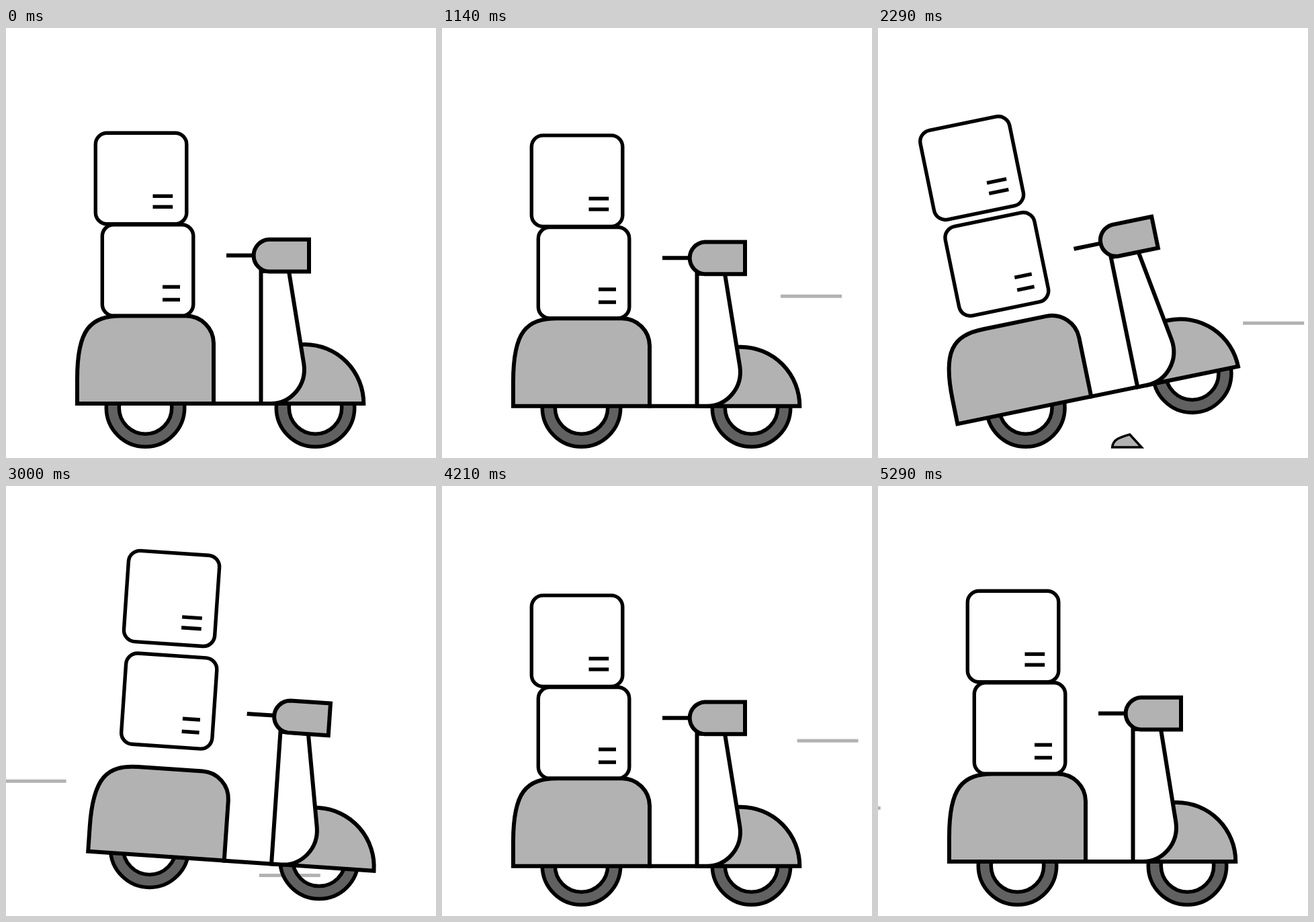
Animation of 640 by 640 pixels, one loop 5370 ms. Source, as an HTML page with a canvas:

```html
<!DOCTYPE html>
<html>
<head>
<meta charset="utf-8">
<title>Delivery scooter</title>
<style>
html, body { margin: 0; width: 100%; height: 100%; overflow: hidden; background: #fff; }
canvas { display: block; }
</style>
</head>
<body>
<canvas id="stage" width="640" height="640"></canvas>
<script>
const ctx = document.getElementById('stage').getContext('2d');
const LOOP = 5370, FPS = 14, LAST = 74;
const GRAY = '#b2b2b2', TIRE = '#616161';
const REAR = 207.5, BASE = 253, AXLE = 565;
const JUMP_START = 27, JUMP_END = 47, BOUNCE = 9, HOP = 64;

const shapes = {
  seat: 'M106 559V522C106 449 125 428.5 172 428.5H268A41 41 0 0 1 309 469V559Z',
  floor: 'M306 559H398',
  fender: 'M395 559L438 471H445A87.5 88 0 0 1 532.3 559Z',
  column: 'M379.5 559V362H421L443.3 500C448 532 424 559 394 559Z',
  lamp: 'M451 314.8H391A23.9 23.9 0 0 0 391 362.5H451Z',
  handle: 'M328 338.5H367',
  rock: 'M350 624C351 612 362 609 376 605L393.5 624Z'
};
for (const k in shapes) shapes[k] = new Path2D(shapes[k]);

// Speed lines: [start tick, row]
const streaks = [[2, 3], [13.15, 5], [17.5, 14], [29.95, 7],
  [36.65, 14], [42.4, 0], [56.65, 4], [60.55, 9]];

// Distance the scenery has passed, slightly accelerating
const travel = s => 46 * s + 0.6 * s * s;

// Half a sine wave between two ticks, zero outside
const arc = (n, from, to) =>
  n > from && n < to ? Math.sin(Math.PI * (n - from) / (to - from)) : 0;

function bounce(n) {
  if (n > JUMP_START && n < JUMP_END) return 0;
  const phase = n <= JUMP_START ? n : n - JUMP_END;
  return 4.48 * (1 - Math.cos(2 * Math.PI * phase / BOUNCE));
}

function draw(path, fill, width = 6) {
  if (fill) { ctx.fillStyle = fill; ctx.fill(path); }
  ctx.strokeStyle = '#000';
  ctx.lineWidth = width;
  ctx.stroke(path);
}

function bar(x, y, length, color, width) {
  ctx.fillStyle = color;
  ctx.fillRect(x, y - width / 2, length, width);
}

function wheel(x, y) {
  for (const [color, width] of [['#000', 24.5], [TIRE, 13.5]]) {
    ctx.beginPath();
    ctx.arc(x, y, 48.75, 0, 7);
    ctx.strokeStyle = color;
    ctx.lineWidth = width;
    ctx.stroke();
  }
}

function box(x, y, markX, markY, markLength, markGap) {
  const p = new Path2D();
  p.roundRect(x, y, 135.5, 135.5, 17);
  draw(p, '#fff', 5.4);
  for (const dy of [0, markGap]) bar(x + markX, y + markY + dy, markLength, '#000', 5.4);
}

function scooter(n) {
  // Each wheel hops over the rock in turn; the body tilts between them and lags behind.
  const front = HOP * arc(n, 27.6, 42.65);
  const rear = HOP * arc(n, 32.5, 43.45);
  const tilt = Math.asin((rear - front) / BASE);
  const wheelX = REAR + 16.5 * arc(n, 27.6, 44);
  const lag = arc(n, 29, 48);
  const toss = arc(n, 27.8, 47.3) ** 2;

  wheel(wheelX, AXLE - rear);
  wheel(wheelX + BASE * Math.cos(tilt), AXLE - front);

  ctx.save();
  ctx.translate(REAR + 20 * lag, AXLE - rear);
  ctx.rotate(tilt);
  ctx.translate(-REAR, -AXLE + 21 * lag + bounce(n));
  draw(shapes.seat, GRAY);
  draw(shapes.floor);
  draw(shapes.fender, GRAY);
  draw(shapes.column, '#fff');
  draw(shapes.handle);
  draw(shapes.lamp, GRAY);
  box(143.3, 292.8 - 58 * toss, 89.7, 92.5, 26, 19.1);
  box(133.3 + 6 * toss, 156.2 - 86 * toss, 85.2, 94, 29.7, 16);
  ctx.restore();
}

function render(n) {
  ctx.fillStyle = '#fff';
  ctx.fillRect(0, 0, 640, 640);
  ctx.save();
  ctx.beginPath();
  ctx.rect(0, 0, 640, 626);
  ctx.clip();

  for (const [start, row] of streaks) {
    if (n > start) bar(640 - travel(n - start), 299 + 20.04 * row, 91, GRAY, 5);
  }
  if (n > 26 && n < 38) {
    ctx.save();
    ctx.translate(291 - travel(n - 26.1), 0);
    draw(shapes.rock, GRAY, 3.5);
    ctx.restore();
  }
  scooter(n);
  ctx.restore();
}

const begin = performance.now();
function tick() {
  const t = (performance.now() - begin) % LOOP;
  render(Math.min(LAST, Math.floor(t * FPS / 1000 + 0.08)));
  requestAnimationFrame(tick);
}
tick();
</script>
</body>
</html>
```
